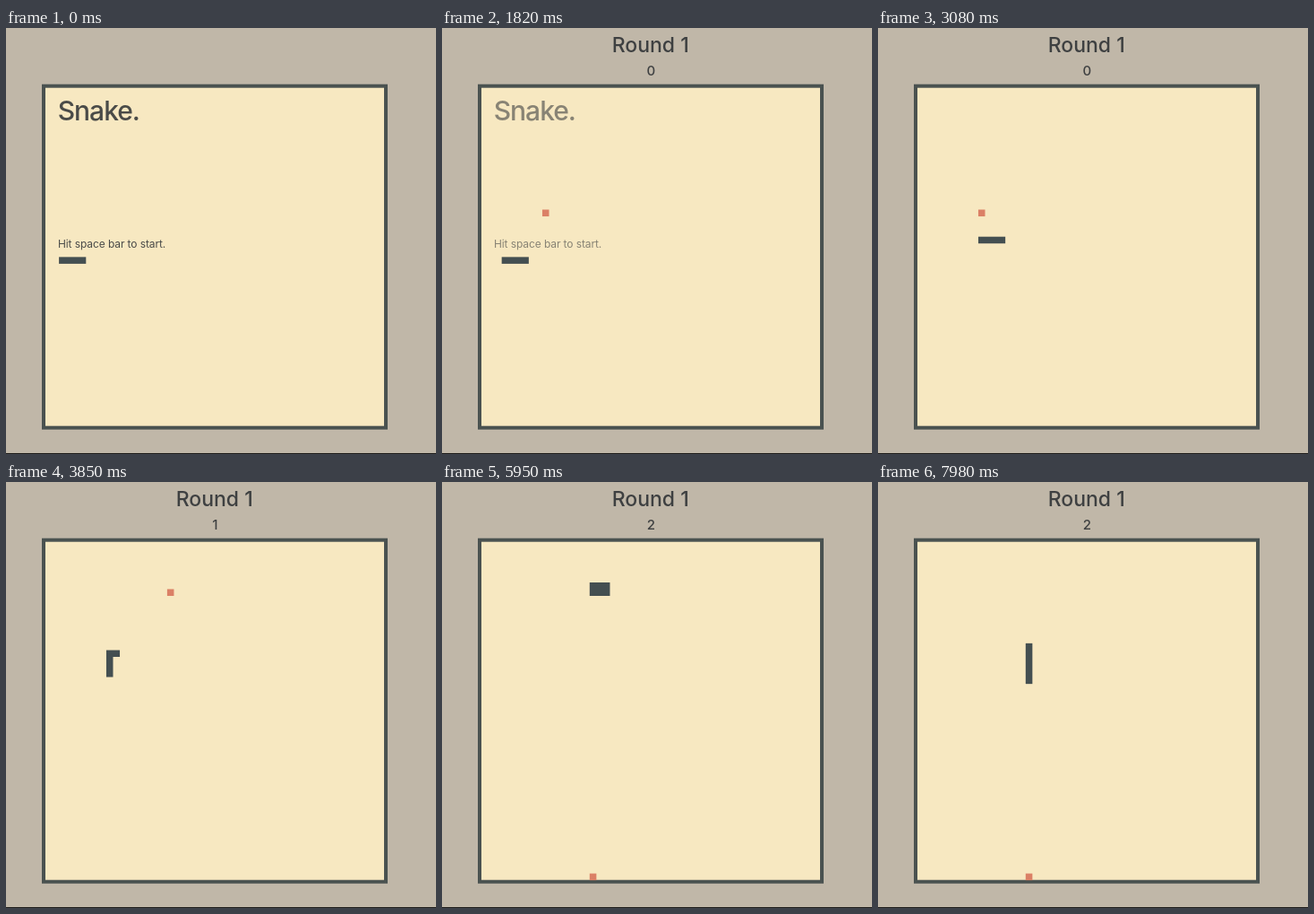
An HTML page that plays this animation: 480 px wide and 475 px high, repeating every 8000 ms.

```html
<!DOCTYPE html>
<html lang="en">
<head>
<meta charset="utf-8">
<title>Snake</title>
<style>
  html, body { margin: 0; width: 100%; height: 100%; overflow: hidden; background: #c0b7a8; }
  svg { display: block; width: 480px; height: 475px; }
  text { font-family: Inter, Roboto, "Liberation Sans", sans-serif; fill: #3e4041; }
  .head { text-anchor: middle; font-weight: 500; }
  #title { font-size: 30px; font-weight: 500; letter-spacing: -1px; }
  #hint { font-size: 12px; letter-spacing: -0.1px; }
  #round { font-size: 23px; }
  #score { font-size: 15px; }
  #snake { fill: none; stroke: #444f51; stroke-linecap: square; stroke-linejoin: miter; }
</style>
</head>
<body>
<svg viewBox="0 0 480 475">
  <rect width="480" height="475" fill="#c0b7a8"/>
  <rect y="474" width="480" height="1" fill="#1c1b19"/>
  <rect x="42" y="64.7" width="382" height="381" fill="#f7e8c1" stroke="#4a5250" stroke-width="4"/>
  <g id="intro">
    <text id="title" x="57.7" y="103">Snake.</text>
    <text id="hint" x="58" y="244.5">Hit space bar to start.</text>
  </g>
  <g id="status">
    <text id="round" class="head" x="232.7" y="27">Round 1</text>
    <text id="score" class="head" x="233.3" y="52.7">0</text>
  </g>
  <rect id="food" fill="#db8066"/>
  <polyline id="snake"/>
</svg>
<script>
const LOOP = 8000, TICK = 70;
const CELL = 7.55, LEFT = 44, TOP = 66.6;
const START = 1610, FIRST_MOVE = 1737, MOVE = 104.2;
const ROUTE = "R7 U3 L3 U6 R5 U9 R4 U1 L5 D6 R3 D8";
const FOODS = [[9, 18], [18, 7], [16, 49]];
const STEP = { R: [1, 0], L: [-1, 0], U: [0, -1], D: [0, 1] };

const $ = id => document.getElementById(id);
const same = (a, b) => a[0] === b[0] && a[1] === b[1];

// Play the whole route once and keep the snake and score after each move.
function play() {
  let body = [[2, 25], [3, 25], [4, 25], [5, 25]], score = 0;
  const states = [{ body, score }];
  for (const leg of ROUTE.split(" ")) {
    const [dx, dy] = STEP[leg[0]];
    for (let i = 0; i < +leg.slice(1); i++) {
      const [x, y] = body[body.length - 1];
      const head = [x + dx, y + dy];
      const eats = same(head, FOODS[score]);
      body = [...body.slice(eats ? 0 : 1), head];
      if (eats) score++;
      states.push({ body, score });
    }
  }
  return states;
}

const states = play();
$("snake").setAttribute("stroke-width", CELL);
$("food").setAttribute("width", CELL);
$("food").setAttribute("height", CELL);

const fade = $("intro").animate([
  { offset: 0, opacity: 0.94, easing: "ease-out" },
  { offset: 1120 / LOOP, opacity: 1 },
  { offset: 1575 / LOOP, opacity: 1, easing: "ease" },
  { offset: 2575 / LOOP, opacity: 0 },
  { offset: 1, opacity: 0 }
], { duration: LOOP, iterations: Infinity });

function draw() {
  const now = (fade.currentTime || 0) % LOOP;
  const t = Math.floor(now / TICK) * TICK;
  const moves = Math.floor((t - FIRST_MOVE) / MOVE) + 1;
  const { body, score } = states[Math.max(0, Math.min(moves, states.length - 1))];
  const centre = ([x, y]) => [LEFT + (x + 0.5) * CELL, TOP + (y + 0.5) * CELL].join();
  const [fx, fy] = FOODS[score];
  const shown = t >= START ? "visible" : "hidden";

  $("snake").setAttribute("points", body.map(centre).join(" "));
  $("food").setAttribute("x", LEFT + fx * CELL);
  $("food").setAttribute("y", TOP + fy * CELL);
  $("food").style.visibility = $("status").style.visibility = shown;
  $("score").textContent = score;
  requestAnimationFrame(draw);
}
draw();
</script>
</body>
</html>
```
